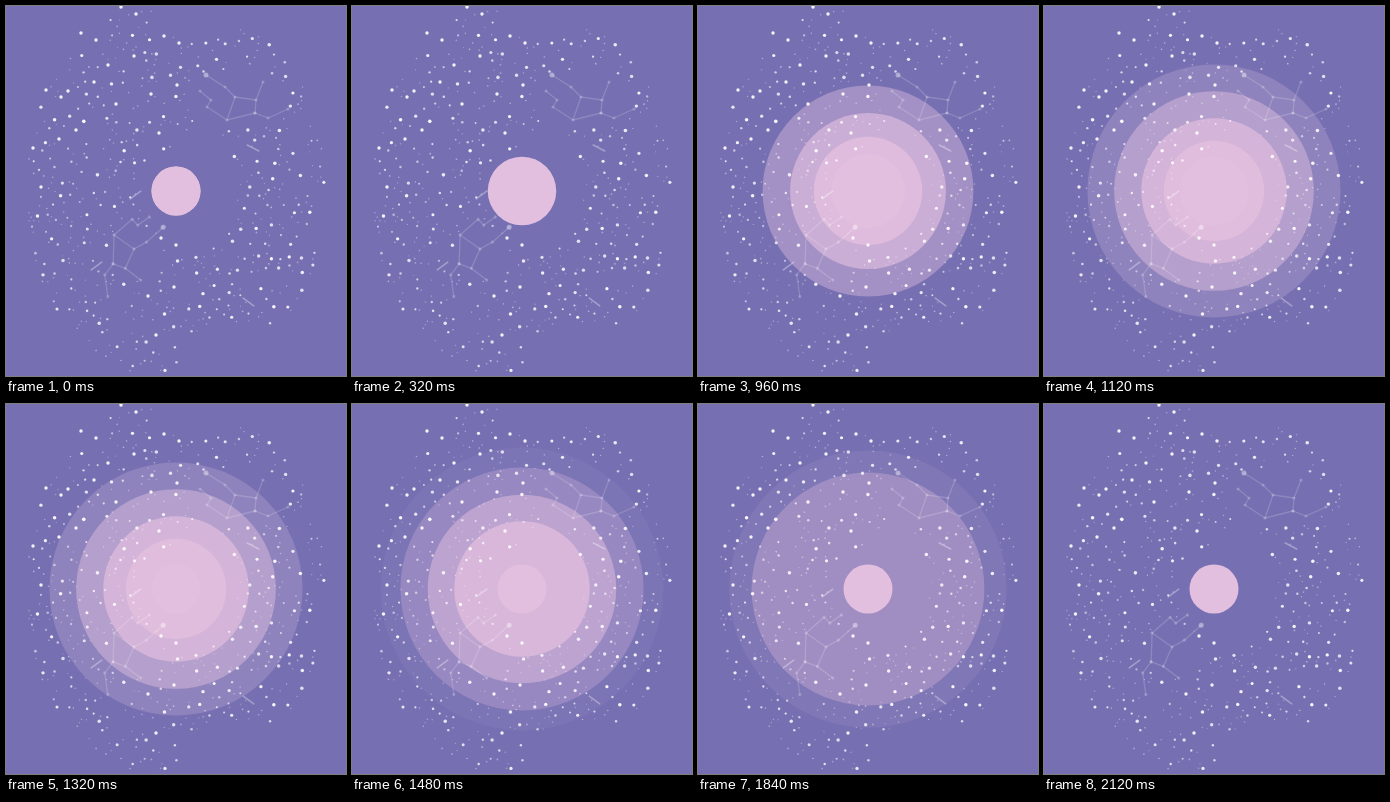
An HTML page with a canvas for the animation above (2.4 s loop, 340 px wide and 370 px high).

```html
<!DOCTYPE html>
<html lang="en">
<head>
<meta charset="utf-8">
<title>Pulse in the stars</title>
<style>
  html, body { margin: 0; width: 100%; height: 100%; overflow: hidden; background: #7670b2; }
  canvas { display: block; }
</style>
</head>
<body>
<canvas id="stage" width="340" height="370"></canvas>
<script>
const ctx = document.getElementById('stage').getContext('2d');
const LOOP = 2400, STEP = 40, RINGS = 5, DELAY = 200;
const CX = 170, CY = 185, BASE = 24.5, FADE_START = 440, FADE_END = 1320;
const PINK = '#e3bfdf', WHITE = '#fff';

// Ellipses as [cx, cy, rx, ry]: the star field and the gaps in it
const field = [CX, CY, 152, 190];
const gaps = [
  [196, 180, 36, 62], [160, 185, 28, 35], [232, 94, 52, 30],
  [125, 245, 24, 30], [240, 352, 70, 36], [195, 8, 50, 22]
];
const inside = (x, y, [cx, cy, rx, ry]) => Math.hypot((x - cx) / rx, (y - cy) / ry) < 1;

let seed = 7;
const random = (min, max) => {
  seed = seed * 16807 % 2147483647;
  return min + (max - min) * seed / 2147483647;
};

const group = [[0, 0], [15, 7], [13, 49], [-13, 58], [-5, 97]];
const origins = [[115, 1], [75, 27], [40, 84], [158, 30], [155, 232]];
const stars = origins.flatMap(([ox, oy]) =>
  group.map(([x, y]) => ({ x: ox + x, y: oy + y, r: 1.7, alpha: 0.9 })));

// Keeps random points that lie in the field and not too near another star
function scatter(tries, spacing, minR, maxR, minAlpha, maxAlpha) {
  for (let i = 0; i < tries; i++) {
    const x = random(17, 323), y = random(0, 370);
    const free = inside(x, y, field) && !gaps.some(gap => inside(x, y, gap))
      && stars.every(s => Math.hypot(s.x - x, s.y - y) > spacing);
    if (free) stars.push({ x, y, r: random(minR, maxR), alpha: random(minAlpha, maxAlpha) });
  }
}
scatter(260, 11, 1.5, 1.8, 0.75, 0.95);
scatter(400, 8, 1, 1.3, 0.5, 0.8);
scatter(700, 4, 0.6, 0.9, 0.25, 0.5);

// Both constellations are one figure, turned
const figure = [
  [[-29, -22], [-10, -10], [0, 0], [21, 3], [28, -15]],
  [[21, 3], [20, 16], [33, 21], [53, 12]],
  [[0, 0], [-8, 23], [20, 16]],
  [[-8, 23], [-28, 10], [-24, 3], [-35, -6]]
];

function disc(x, y, r, color, alpha) {
  ctx.globalAlpha = alpha;
  ctx.fillStyle = color;
  ctx.beginPath();
  ctx.arc(x, y, r, 0, 2 * Math.PI);
  ctx.fill();
}

function strokePath(points, width, alpha) {
  ctx.globalAlpha = alpha;
  ctx.lineWidth = width;
  ctx.beginPath();
  points.forEach(p => ctx.lineTo(...p));
  ctx.stroke();
}

function drawConstellation(x, y, degrees) {
  ctx.save();
  ctx.translate(x, y);
  ctx.rotate(degrees * Math.PI / 180);
  for (const path of figure) {
    strokePath(path, 1.3, 0.17);
    path.slice(1).forEach(([px, py]) => disc(px, py, 1.6, WHITE, 0.2));
  }
  disc(...figure[0][0], 2.5, WHITE, 0.4);
  ctx.restore();
}

function drawDash(x, y, degrees) {
  const angle = degrees * Math.PI / 180, dx = 6.5 * Math.cos(angle), dy = 6.5 * Math.sin(angle);
  strokePath([[x - dx, y - dy], [x + dx, y + dy]], 1.6, 0.33);
}

function drawSky() {
  ctx.strokeStyle = WHITE;
  ctx.lineCap = ctx.lineJoin = 'round';
  drawConstellation(229, 91, 0);
  drawConstellation(128, 243, 106);
  drawDash(129.5, 189, -36);
  drawDash(90.5, 260, -36);
  drawDash(247, 142, 27);
  drawDash(242.5, 296, 36);
  for (const { x, y, r, alpha } of stars) disc(x, y, r, WHITE, alpha);
}

function drawRing(age) {
  if (age < 0 || age >= FADE_END) return;
  const s = age / 1000;
  const radius = BASE + s * s * (95.5 - 9 * s ** 4);
  const alpha = Math.min(1, (FADE_END - age) / (FADE_END - FADE_START));
  disc(CX, CY, radius, PINK, alpha);
}

const start = performance.now();
function frame() {
  const elapsed = (performance.now() - start) % LOOP;
  const time = Math.floor(elapsed / STEP) * STEP;
  ctx.globalAlpha = 1;
  ctx.fillStyle = '#7670b2';
  ctx.fillRect(0, 0, 340, 370);
  for (let i = 0; i < RINGS; i++) drawRing(time - i * DELAY);
  disc(CX, CY, BASE, PINK, 1);
  drawSky();
  requestAnimationFrame(frame);
}
frame();
</script>
</body>
</html>
```
